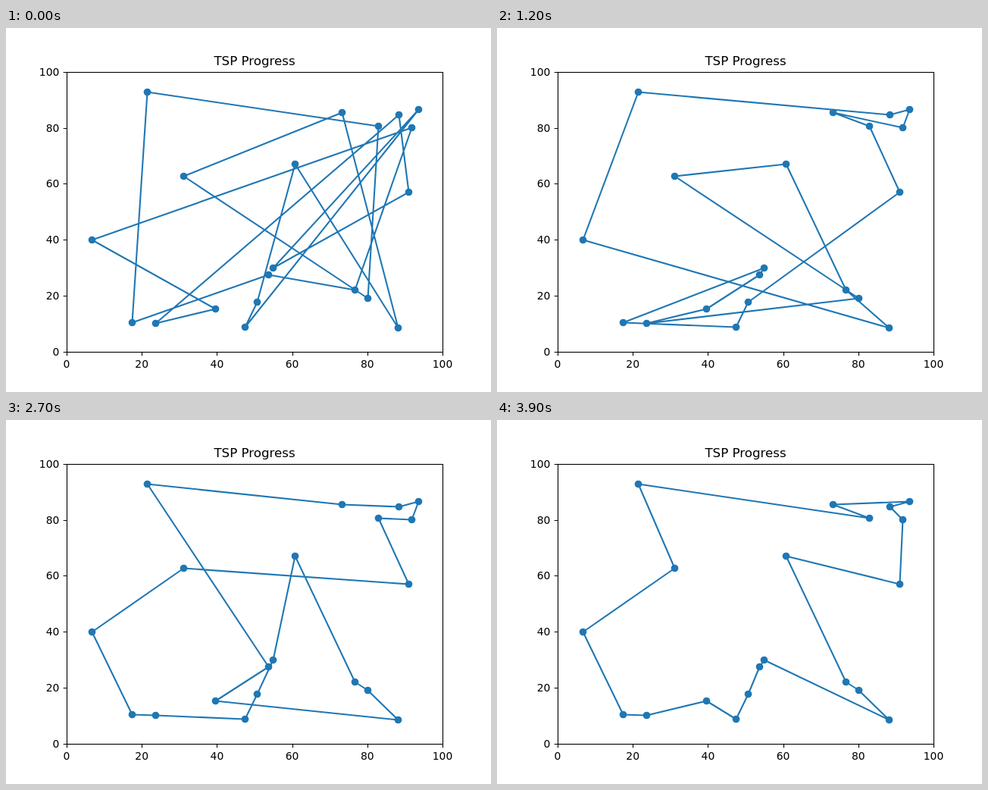
Recreate the animation shown at these times as an HTML page. Size 640 by 480 pixels, loop 4000 ms.

```html
<!DOCTYPE html>
<html lang="en">
<head>
<meta charset="utf-8">
<title>TSP Progress</title>
<style>
html, body { margin: 0; width: 100%; height: 100%; overflow: hidden; background: #fff; }
svg { display: block; width: 640px; height: 480px; }
text { font-family: "DejaVu Sans", sans-serif; font-size: 13.889px; fill: #000; }
.title { font-size: 16.667px; }
.mid { text-anchor: middle; }
.end { text-anchor: end; }
.axis { fill: none; stroke: #000; stroke-width: 1.11; }
#tour { fill: none; stroke: #1f77b4; stroke-width: 2.083; stroke-linejoin: round; }
#cities { fill: #1f77b4; }
</style>
</head>
<body>
<svg viewBox="0 0 640 480" xmlns="http://www.w3.org/2000/svg">
  <polygon id="tour"/>
  <g id="cities"></g>
  <g id="axes"><rect class="axis" x="80.5" y="58.5" width="496" height="369"/></g>
  <text class="title mid" x="328" y="49">TSP Progress</text>
</svg>
<script>
const STEP = 100, STEPS = 40;

const cities = {
  A: [186, 84], B: [491, 129], C: [443, 111], D: [518, 114], E: [544, 107],
  F: [535, 131], G: [234, 195], H: [381, 179], I: [531, 216], J: [113, 279],
  K: [352, 316], L: [346, 325], M: [331, 361], N: [276, 370], O: [166, 388],
  P: [197, 389], Q: [315, 394], R: [460, 345], S: [477, 356], T: [517, 395]
};

// Milestone tours: [step, visiting order]. Step 32 only turns the direction.
const tours = [
  [0, "AOLRFJNPDIKEQMHTCGSB"],
  [6, "ADEFBTIMQOKHSPNCGRLJ"],
  [7, "ADEFCTIMQOKHSPNBGRLJ"],
  [12, "ADEFCBIMQOKLNPSGHRTJ"],
  [21, "ACEFDBITQOPLMKHGSRNJ"],
  [24, "ACDEFBITSRGHKLMNQPOJ"],
  [27, "ACDEFBIGJOPQMKHRSTNL"],
  [32, "ACDEFBIGJOPQNMLRSTKH"],
  [32, "AHKTSRLMNQPOJGIBFEDC"],
  [36, "ABCEDFIHKTRSLMQNPOJG"],
  [39, "ABCEDFIHRSTKLMQNPOJG"]
];

const svg = id => document.getElementById(id);

function add(parent, tag, attrs, text = "") {
  const el = document.createElementNS("http://www.w3.org/2000/svg", tag);
  for (const k in attrs) el.setAttribute(k, attrs[k]);
  el.textContent = text;
  parent.append(el);
}

// All tours met while turning a into b by 2-opt segment reversals.
function reversals(a, b) {
  const path = [a];
  for (let i = 0; i < b.length; i++) {
    const j = a.indexOf(b[i]);
    if (j === i) continue;
    const part = [...a.slice(i, j + 1)].reverse().join("");
    a = a.slice(0, i) + part + a.slice(j + 1);
    path.push(a);
  }
  return path;
}

function tourAt(step) {
  const i = tours.findLastIndex(([s]) => s <= step);
  const [start, from] = tours[i];
  if (start === step) return from;
  const [end, to] = tours[i + 1];
  const path = reversals(from, to);
  return path[Math.round((path.length - 1) * (step - start) / (end - start))];
}

function drawAxes() {
  const axes = svg("axes");
  for (let v = 0; v <= 100; v += 20) {
    const x = Math.round(80 + 4.96 * v) + 0.5;
    const y = Math.round(427.2 - 3.696 * v) + 0.5;
    add(axes, "path", { class: "axis", d: `M${x} 427.5v4.86M80.5 ${y}h-4.86` });
    add(axes, "text", { class: "mid", x: 80 + 4.96 * v, y: 448 }, v);
    add(axes, "text", { class: "end", x: 70.3, y: y + 4.5 }, v);
  }
}

function drawCities() {
  for (const [x, y] of Object.values(cities))
    add(svg("cities"), "circle", { cx: x + 0.5, cy: y + 0.5, r: 4.86 });
}

const frames = Array.from({ length: STEPS }, (_, step) =>
  [...tourAt(step)].map(c => cities[c].map(n => n + 0.5).join()).join(" "));

let shown = -1;
function render(ms) {
  const step = Math.floor(ms / STEP) % STEPS;
  if (step === shown) return;
  shown = step;
  svg("tour").setAttribute("points", frames[step]);
}

drawAxes();
drawCities();
render(0);
const t0 = performance.now();
function tick() {
  render(performance.now() - t0);
  requestAnimationFrame(tick);
}
requestAnimationFrame(tick);
</script>
</body>
</html>
```
